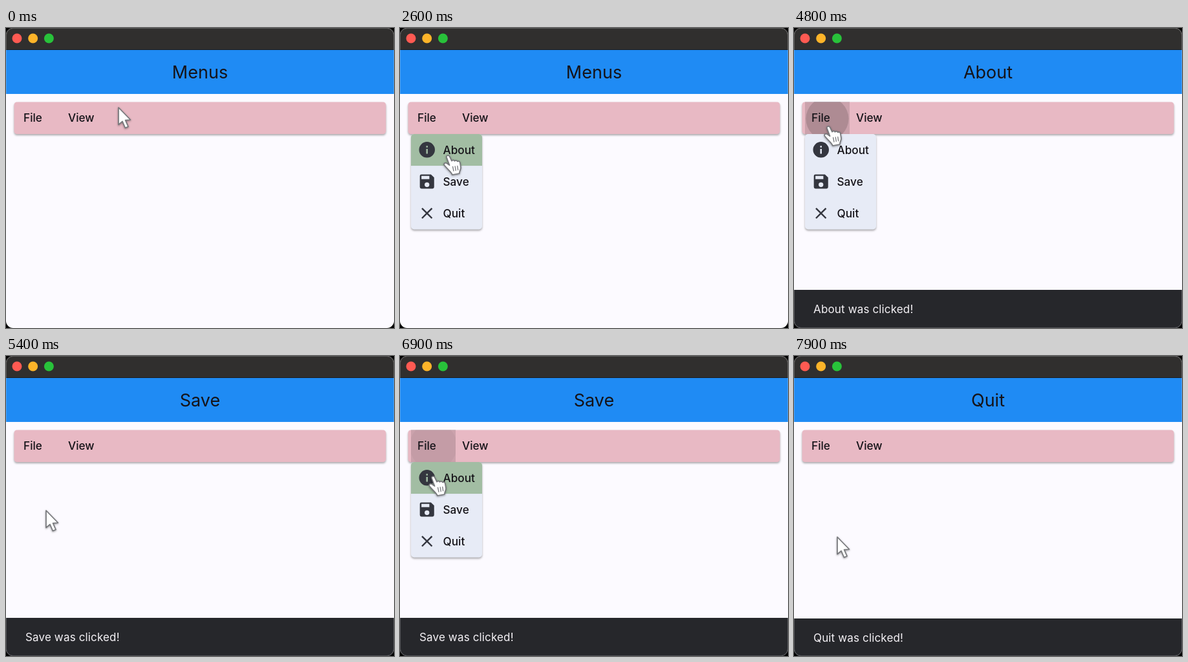
An HTML page that plays this animation: 600 px wide and 464 px high, repeating every 8000 ms.

```html
<!DOCTYPE html>
<html lang="en">
<head>
<meta charset="utf-8">
<title>Menus</title>
<style>
  html, body { margin: 0; width: 100%; height: 100%; overflow: hidden; background: #000; }
  svg { display: block; width: 600px; height: 464px; }
  text { font: 500 17.2px Inter, "Open Sans", sans-serif; font-optical-sizing: none; fill: #151318; }
  #title { font-size: 27px; font-weight: 400; text-anchor: middle; }
  #message { font-size: 17px; font-weight: 400; letter-spacing: .15px; fill: #f4f1f5; }
  .raised { filter: drop-shadow(0 2px 1.5px rgba(0, 0, 0, .32)); }
  .icon { fill: #34363f; }
  #cursor { filter: drop-shadow(0 1.5px 1.5px rgba(0, 0, 0, .4)); }
  #cursor path { fill: #fff; stroke: #77787c; stroke-width: 1.7; stroke-linejoin: round; }
  #hand .gap { fill: none; stroke-width: 1.3; stroke-linecap: round; }
</style>
</head>
<body>
<svg viewBox="0 0 600 464">
  <defs>
    <clipPath id="window"><rect width="600" height="464" rx="11"/></clipPath>
    <clipPath id="fileButton"><rect x="17" y="114" width="69" height="50"/></clipPath>
    <clipPath id="panelShape"><rect x="17" y="164" width="110" height="147.5" rx="5"/></clipPath>
  </defs>

  <g clip-path="url(#window)">
    <rect width="600" height="464" fill="#fcfaff"/>
    <rect width="600" height="34" fill="#302f2e"/>
    <rect y="33" width="600" height="1" fill="#1b1d22"/>
    <circle cx="17" cy="16" r="7.5" fill="#ff5a52"/>
    <circle cx="41.7" cy="16" r="7.5" fill="#fdb429"/>
    <circle cx="66.4" cy="16" r="7.5" fill="#28c23a"/>
    <rect y="34" width="600" height="68" fill="#1f8bf4"/>
    <text id="title" x="300" y="77.6"></text>

    <rect class="raised" x="12.5" y="114.5" width="575" height="49.5" rx="4.5" fill="#e8b9c4"/>
    <g clip-path="url(#fileButton)">
      <rect id="fileHover" x="17" y="114" width="69" height="50" fill-opacity=".125"/>
      <circle id="ripple" fill="#000"/>
    </g>
    <text x="27" y="145.3">File</text>
    <text x="96" y="145.3">View</text>

    <g id="menu">
      <rect class="raised" x="17" y="164" width="110" height="147.5" rx="5" fill="#e7ebf6"/>
      <g clip-path="url(#panelShape)">
        <rect id="rowHover" x="17" width="110" height="49.1" fill="#a2bda3"/>
      </g>
      <g class="icon">
        <path transform="translate(27 173.6) scale(1.227)" d="M12 2a10 10 0 1 0 0 20 10 10 0 0 0 0-20zm1 15h-2v-6h2zm0-8h-2V7h2z"/>
        <path transform="translate(27 222.7) scale(1.227)" d="M17 3H5a2 2 0 0 0-2 2v14a2 2 0 0 0 2 2h14a2 2 0 0 0 2-2V7zm-5 16a3 3 0 1 1 0-6 3 3 0 0 1 0 6zm3-10H5V5h10z"/>
        <path transform="translate(27 271.8) scale(1.227)" d="M19 6.4 17.6 5 12 10.6 6.4 5 5 6.4l5.6 5.6L5 17.6 6.4 19l5.6-5.6 5.6 5.6 1.4-1.4-5.6-5.6z"/>
      </g>
      <text x="66.5" y="194.5">About</text>
      <text x="66.5" y="243.7">Save</text>
      <text x="66.5" y="292.8">Quit</text>
    </g>

    <g id="snack">
      <rect y="405" width="600" height="60" fill="#26272b"/>
      <text id="message" x="30" y="440.6"></text>
    </g>
    <rect x=".5" y=".5" width="599" height="463" rx="10.5" fill="none" stroke="#fff" stroke-opacity=".2"/>
  </g>

  <g id="cursor">
    <path id="arrow" d="M0 0V26.5L6 21.4 10.4 31.5 15 29.5 10.6 19.6 18.5 19z"/>
    <g id="hand">
      <path d="M0 3C-.8 .2 3.2-1.2 4.6 1.6L8 8.6C9.5 6.8 11.5 7 12.4 8.8 13.8 7.2 16 7.6 16.8 9.4 18.6 8.4 20.4 9.2 20.8 11.4L22 18.5C22.3 21.5 20 23.5 19.8 28L8.8 30C8 26 2 22-3 15.8-5.4 12.4-2 10.8 .4 12.4L4.6 15.2z"/>
      <path class="gap" d="M9.6 17.5 10.9 24M13.2 17 14.3 23.4M16.8 16.5 17.7 22.6"/>
    </g>
  </g>
</svg>

<script>
const LOOP = 8000;
const ROW_TOP = 164, ROW_HEIGHT = 49.1, SNACK_HEIGHT = 59;
const el = id => document.getElementById(id);
const clamp = v => Math.min(1, Math.max(0, v));
const mix = (a, b, p) => a + (b - a) * p;
const within = (t, [from, to]) => t >= from && t < to;
const show = (id, on) => el(id).setAttribute("visibility", on ? "visible" : "hidden");

function set(id, attrs) {
  for (const name in attrs) el(id).setAttribute(name, attrs[name]);
}

// Pointer stops: time, x, y
const path = [
  [0, 174, 123], [250, 174, 123], [1000, 72, 148], [1300, 67, 157], [1600, 67, 157],
  [1900, 68, 172], [2250, 70, 207], [2600, 72, 197], [3600, 72, 197], [4350, 51, 152],
  [4900, 51, 152], [5250, 62, 239], [6100, 62, 239], [6450, 47, 152], [6700, 47, 156],
  [6900, 49, 186], [7130, 67, 280], [LOOP, 67, 280]
];
const presses = [1400, 4693, 6600];
const menuOpen = [[1480, 3250], [4780, 5370], [6680, 7180]];
const fileLit = [[950, 1850], [4250, 5050], [6380, 6960]];
const pages = [[0, "Menus"], [3300, "About"], [5380, "Save"], [7180, "Quit"]];
// Snack bar moves: start time, direction, lowest visible share
const snackMoves = [[3414, 1, 0], [5460, -1, .085], [5728, 1, .085], [7430, -1, 0], [7704, 1, 0]];

const last = (list, t) => list.filter(item => item[0] <= t).pop();

function pointerAt(t) {
  const i = path.findIndex(stop => stop[0] > t);
  const [t0, x0, y0] = path[i - 1], [t1, x1, y1] = path[i];
  const p = (t - t0) / (t1 - t0), ease = p * p * (3 - 2 * p);
  return [mix(x0, x1, ease), mix(y0, y1, ease)];
}

function drawRipple(t) {
  const press = presses.filter(time => time <= t).pop();
  if (press === undefined) return set("ripple", { r: 0 });
  const p = clamp((t - press) / 120);
  const [x, y] = pointerAt(press);
  set("ripple", {
    cx: mix(x, 51.5, p), cy: mix(y, 139, p), r: 36.7 * p,
    "fill-opacity": .145 * (1 - clamp((t - press - 150) / 200))
  });
}

function drawSnack(t) {
  const [start, direction, floor] = last(snackMoves, t) || [0, -1, 0];
  const moved = clamp((t - start) / 250);
  const p = snackMoves[0][0] > t ? 0 : direction > 0 ? moved : 1 - moved;
  const eased = p < .5 ? 8 * p ** 4 : 1 - 8 * (1 - p) ** 4;
  set("snack", { transform: `translate(0 ${SNACK_HEIGHT * (1 - Math.max(floor, eased))})` });
  show("snack", Math.max(floor, eased) > 0);
  set("message", { opacity: clamp((p - .4) / .2) });
}

function draw(t) {
  const [x, y] = pointerAt(t);
  const open = menuOpen.some(span => within(t, span));
  const row = Math.floor((y - ROW_TOP) / ROW_HEIGHT);
  const overRow = open && row >= 0 && row < 3;
  const overFile = x > 17 && x < 86 && y > 114 && y < ROW_TOP;
  const page = last(pages, t)[1];

  el("title").textContent = page;
  el("message").textContent = `${page} was clicked!`;

  const lit = Math.max(...fileLit.map(([from, to]) =>
    Math.min(clamp((t - from) / 60), 1 - clamp((t - to) / 100))));
  set("fileHover", { opacity: lit });
  drawRipple(t);

  show("menu", open);
  show("rowHover", overRow);
  set("rowHover", { y: ROW_TOP + row * ROW_HEIGHT });
  drawSnack(t);

  set("cursor", { transform: `translate(${x} ${y})` });
  show("hand", overRow || overFile);
  show("arrow", !overRow && !overFile);
}

const begin = performance.now();
function tick() {
  draw((performance.now() - begin) % LOOP);
  requestAnimationFrame(tick);
}
tick();
</script>
</body>
</html>
```
